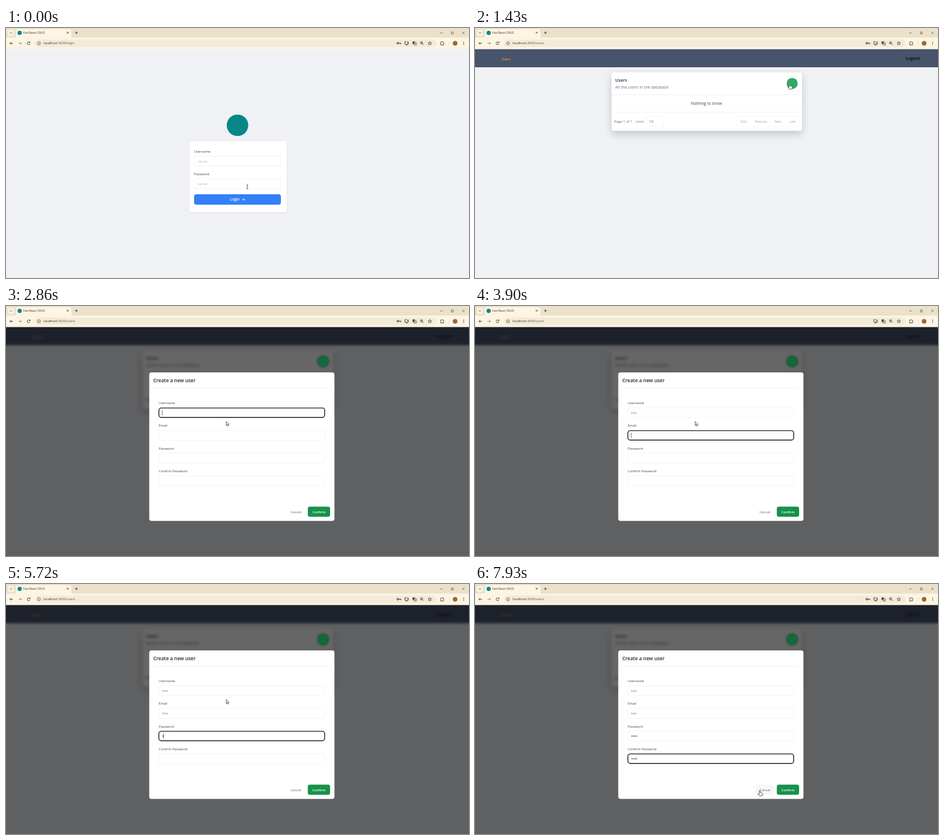
These frames come from a looping animation (800 px wide and 433 px high, 8000 ms). An HTML page with a canvas:

```html
<!DOCTYPE html>
<html lang="en">
<head>
<meta charset="utf-8">
<title>Fast React CRUD</title>
<style>
html, body { margin: 0; width: 100%; height: 100%; overflow: hidden; background: #eff1f4; }
canvas { display: block; width: 800px; height: 433px; }
</style>
</head>
<body>
<canvas id="stage"></canvas>
<script>
const W = 800, H = 433, LOOP = 8000, STEP = 130;
const INK = '#1f2937', LABEL = '#374151', LINE = '#e9ebef', TEAL = '#078688', GREEN = '#16924b';
const dpr = window.devicePixelRatio || 1;

function makeContext(canvas) {
  canvas.width = W * dpr;
  canvas.height = H * dpr;
  const context = canvas.getContext('2d');
  context.scale(dpr, dpr);
  return context;
}

const screen = makeContext(document.getElementById('stage'));
let c = screen;

function rect(x, y, w, h, fill) {
  c.fillStyle = fill;
  c.fillRect(x, y, w, h);
}

function round(x, y, w, h, r, fill, stroke, width = 1) {
  c.beginPath();
  c.roundRect(x, y, w, h, r);
  if (fill) { c.fillStyle = fill; c.fill(); }
  if (stroke) { c.strokeStyle = stroke; c.lineWidth = width; c.stroke(); }
}

function circle(x, y, r, fill) {
  c.beginPath();
  c.arc(x, y, r, 0, Math.PI * 2);
  c.fillStyle = fill;
  c.fill();
}

function ring(x, y, r, color, width = 0.8, from = 0, to = Math.PI * 2) {
  c.beginPath();
  c.arc(x, y, r, from, to);
  c.strokeStyle = color;
  c.lineWidth = width;
  c.stroke();
}

function stroke(path, color = '#3b372f', width = 0.9) {
  c.strokeStyle = color;
  c.lineWidth = width;
  c.stroke(new Path2D(path));
}

function text(str, x, y, size, color = LABEL, weight = 400) {
  c.font = `${weight} ${size}px "Open Sans", "Noto Sans", sans-serif`;
  c.fillStyle = color;
  c.fillText(str, x, y);
}

function shadowed(blur, dy, color, draw) {
  c.save();
  c.shadowBlur = blur * dpr;
  c.shadowOffsetY = dy * dpr;
  c.shadowColor = color;
  draw();
  c.restore();
}

function browser(path, showKey) {
  const cream = '#fdf4e3';
  rect(0, 0, W, 17, '#ebe1c9');
  round(3, 3, 11, 11, 3, '#f8f0df');
  stroke('M7 7.7 L8.5 9.2 L10 7.7');
  round(17, 2, 96, 18, 4, cream);
  rect(0, 16.5, W, 20, cream);
  circle(23.6, 8.4, 3.6, TEAL);
  text('Fast React CRUD', 30, 10.2, 4.8, '#38342c');
  stroke('M105 6.5 l3.2 3.2 m0 -3.2 l-3.2 3.2');
  stroke('M119.3 8.2 h4.8 m-2.4 -2.4 v4.8');
  stroke('M750.3 8.5 h4', '#4a453a', 0.7);
  stroke('M769.5 6.9 h3.4 v3.4 h-3.4 z', '#4a453a', 0.7);
  stroke('M788.6 6.6 l3.6 3.6 m0 -3.6 l-3.6 3.6', '#4a453a', 0.7);

  stroke('M12 26.5 H7 m2.2 -2.3 l-2.3 2.3 l2.3 2.3');
  stroke('M21.7 26.5 h5 m-2.2 -2.3 l2.3 2.3 l-2.3 2.3', '#8f897c');
  ring(39, 26.5, 2.5, '#3b372f', 0.9, 0.3, 5.3);
  stroke('M41.7 23.4 v2.1 h-2.1');
  round(50, 20, 694, 13, 6.5, '#f3ead7');
  ring(57, 26.4, 2.6, '#4b463b', 0.7);
  stroke('M57 26 v1.7 m0 -2.8 v0.5', '#4b463b', 0.7);
  text('localhost', 65, 28.4, 5.65, '#2f2c26');
  const hostWidth = c.measureText('localhost').width;
  text(':3000' + path, 65 + hostWidth, 28.4, 5.65, '#5c574c');

  if (showKey) {
    ring(677, 26.3, 1.5, '#3b372f', 1.1);
    stroke('M678.5 26.3 h4.3 m-1 0 v1.7', '#3b372f', 1.1);
  }
  stroke('M692.5 23.7 h-3.3 v4.4 h6 v-1.6 m-4.3 3 h2.7 m1 -6.2 v3 m-1.3 -1.2 l1.3 1.3 l1.3 -1.3');
  round(702.5, 23.2, 4, 4.5, 0.5, '#4b463b');
  round(705.2, 25.2, 4, 4.6, 0.5, cream, '#4b463b', 0.7);
  stroke('M706.2 28.8 l1 -2.4 l1 2.4', '#4b463b', 0.6);
  ring(718, 25.7, 2, '#3b372f', 0.8);
  stroke('M719.5 27.2 l2 2 m-4.5 -3.5 h2');
  stroke('M732.3 23.4 l0.9 1.9 l2.1 0.2 l-1.6 1.4 l0.5 2.1 l-1.9 -1.1 l-1.9 1.1 l0.5 -2.1 l-1.6 -1.4 l2.1 -0.2 z', '#3b372f', 0.8);
  stroke('M751 24.3 h1.6 q0.8 -1.9 1.6 0 h1.8 v1.6 q1.9 0.8 0 1.6 v1.9 h-5 v-1.7 q1.6 -0.8 0 -1.7 z');
  rect(765, 23, 0.6, 7, '#e2d7bd');
  circle(776, 26.4, 4, '#94693f');
  for (const y of [24.3, 26.4, 28.5]) circle(790.8, y, 0.7, '#3b372f');
}

function inputLines(x, y, w) {
  round(x, y, w, 17, 3.5, '#fff', LINE, 0.6);
}

function loginPage() {
  rect(0, 36.5, W, H, '#eff1f4');
  circle(400, 168.5, 18.6, TEAL);
  shadowed(3, 1, 'rgba(0,0,0,.08)', () => round(317, 196, 168, 123, 4, '#fff'));
  ['Username', 'Password'].forEach((name, i) => {
    const y = 222 + i * 39.3;
    text(name, 325, y - 6, 5.8, LABEL, 500);
    inputLines(325, y, 150);
    text('owner', 331, y + 10.8, 6, '#b4b5b9');
  });
  round(325, 288, 150, 18, 4, '#3480f8');
  text('Login', 387.3, 299.3, 6.2, '#fff', 600);
  stroke('M407.5 297.2 h5 m-1.7 -1.6 l1.7 1.6 l-1.7 1.6', '#fff', 0.8);
}

function usersPage(hovered) {
  rect(0, 36.5, W, H, '#eff1f4');
  rect(0, 36.5, W, 31.5, '#48546b');
  text('Users', 46, 55.8, 5.6, '#ee8641', 700);
  text('Logout', 744, 54.8, 7.2, '#10141c', 700);
  shadowed(13, 6, 'rgba(20,30,50,.2)', () => round(236, 77, 329, 101, 4, '#fff'));
  text('Users', 242.3, 93.4, 7.6, INK, 600);
  text('All the users in the database', 242.3, 105, 7, '#6b7280');
  rect(236, 115, 329, 0.7, LINE);
  text('Nothing to show', 373, 133, 7, '#374151');
  rect(236, 145.6, 329, 0.7, LINE);
  text('Page 1 of 1', 240.5, 164.3, 6.1, '#5b6472');
  text('Limit:', 277.7, 164.3, 5.9, '#5b6472');
  inputLines(296, 153.5, 30);
  text('10', 301, 164.3, 6, '#4b5563');
  round(452, 153.5, 109, 17, 3, null, '#eff0f3', 0.6);
  [['First', 459], ['Previous', 483.4], ['Next', 518], ['Last', 543.8]]
    .forEach(([name, x]) => text(name, x, 164, 5.2, '#9097a2'));
  circle(548, 96, 9.5, '#16a052');
  if (hovered) for (let r = 2; r < 9; r += 2) ring(548, 96, r, 'rgba(255,255,255,.42)', 0.6);
}

// The page behind the dialog never changes, so its blurred copy is built once.
function buildBackdrop() {
  const sharp = document.createElement('canvas');
  const soft = document.createElement('canvas');
  c = makeContext(sharp);
  usersPage(false);
  rect(0, 0, W, 37, '#48546b');
  c = makeContext(soft);
  c.drawImage(sharp, 0, 0, W, H);
  c.filter = `blur(${2 * dpr}px)`;
  c.drawImage(sharp, 0, 0, W, H);
  c.filter = 'none';
  rect(0, 0, W, H, 'rgba(0,0,0,.6)');
  circle(548, 96, 9, '#106a39');
  c = screen;
  return soft;
}

const fields = [
  { name: 'Username', focus: 1820, typed: [3120, 3250, 3380, 3640] },
  { name: 'Email', focus: 3900, typed: [4290, 4420, 4550, 4680] },
  { name: 'Password', focus: 4940, typed: [5720, 5850, 5980, 6110], secret: true },
  { name: 'Confirm Password', focus: 6760, typed: [7020, 7150, 7280, 7410], secret: true }
];

function drawField(field, i, t) {
  const y = 176.4 + i * 39.25;
  const next = fields[i + 1];
  const focused = t >= field.focus && (!next || t < next.focus);
  const count = field.typed.filter(at => at <= t).length;
  text(field.name, 264, y - 6.2, 5.8, LABEL, 500);
  inputLines(264, y, 287);
  if (focused) round(264.2, y + 0.2, 286.4, 16.4, 4, '#fff', '#16181d', 1.4);

  let end = 269.6;
  if (field.secret) {
    for (let k = 0; k < count; k++) circle(271.2 + k * 2.65, y + 8.5, 0.9, '#30343b');
    end += count * 2.65;
  } else {
    const value = 'kite'.slice(0, count);
    text(value, 269.8, y + 10.6, 5.8, '#81858d');
    end += c.measureText(value).width;
  }
  const lastInput = count ? field.typed[count - 1] : field.focus;
  const caretOn = Math.floor((t - lastInput) / 500) % 2 === 0;
  if (focused && caretOn) rect(end, y + 4, 0.7, 9, '#333');
}

function dialog(t) {
  round(247.5, 115, 320, 257.3, 4, '#fff');
  text('Create a new user', 254.5, 132.2, 8.45, INK, 600);
  rect(255, 142.2, 305, 0.6, LINE);
  fields.forEach((field, i) => drawField(field, i, t));
  if (t >= 7930) round(484.5, 347.5, 33, 17.5, 4, '#f6f7f9');
  text('Cancel', 491.5, 358.8, 6.1, '#5b6472');
  round(521.5, 347.5, 38.5, 17.5, 3.5, GREEN);
  text('Confirm', 529.2, 358.7, 5.85, '#fff', 600);
}

const pointerPath = [
  [0, 417, 275], [260, 406, 297], [520, 405, 296], [910, 402, 258],
  [1430, 543.5, 97], [1560, 508, 154], [1820, 440, 184],
  [2210, 396, 188], [2730, 380.5, 200], [7540, 380.5, 200], [7930, 492, 358]
];

function pointerAt(t) {
  const i = pointerPath.findIndex(p => p[0] > t);
  if (i < 0) return pointerPath[pointerPath.length - 1].slice(1);
  const [t0, x0, y0] = pointerPath[i - 1], [t1, x1, y1] = pointerPath[i];
  const u = (t - t0) / (t1 - t0), k = u * u * (3 - 2 * u);
  return [x0 + (x1 - x0) * k, y0 + (y1 - y0) * k];
}

const inside = (x, y, l, t, r, b) => x >= l && x <= r && y >= t && y <= b;

function cursorKind(page, x, y) {
  if (page === 'login') {
    if (inside(x, y, 325, 288, 475, 306)) return 'hand';
    return inside(x, y, 325, 222, 475, 279) ? 'beam' : 'arrow';
  }
  if (page === 'users') return Math.hypot(x - 548, y - 96) < 10 ? 'hand' : 'arrow';
  if (inside(x, y, 485, 347, 560, 365)) return 'hand';
  const overField = fields.some((_, i) => inside(x, y, 264, 176.4 + i * 39.25, 551, 193.4 + i * 39.25));
  return overField ? 'beam' : 'arrow';
}

const glyphs = {
  arrow: 'M0 0 V7 L1.6 5.5 L2.7 8 L3.9 7.5 L2.8 5.1 H5 Z',
  hand: 'M-0.8 0.3 Q0 -0.7 0.8 0.3 V3.2 L4 3.9 Q5 4.2 4.8 5.2 L4 9 H-0.6 L-3.1 5.6 Q-2.6 4.5 -0.8 6 Z',
  beam: 'M-1.5 -3.2 H1.5 M0 -3.2 V3.2 M-1.5 3.2 H1.5'
};

function cursor(kind, x, y) {
  c.save();
  c.translate(x, y);
  if (kind !== 'beam') {
    c.fillStyle = '#fff';
    c.fill(new Path2D(glyphs[kind]));
  }
  stroke(glyphs[kind], '#33363b', 0.8);
  c.restore();
}

const backdrop = buildBackdrop();

function render(t) {
  const page = t < 520 ? 'login' : t < 1560 ? 'users' : 'dialog';
  const [x, y] = pointerAt(t);
  const kind = cursorKind(page, x, y);
  if (page === 'login') loginPage();
  else if (page === 'users') usersPage(kind === 'hand');
  else {
    c.drawImage(backdrop, 0, 0, W, H);
    dialog(t);
  }
  browser(page === 'login' ? '/login' : '/users', t < 3120 || t >= 5720);
  cursor(kind, x, y);
}

function tick() {
  const t = performance.now() % LOOP;
  render(Math.floor((t + 0.5) / STEP) * STEP);
  requestAnimationFrame(tick);
}
tick();
</script>
</body>
</html>
```
